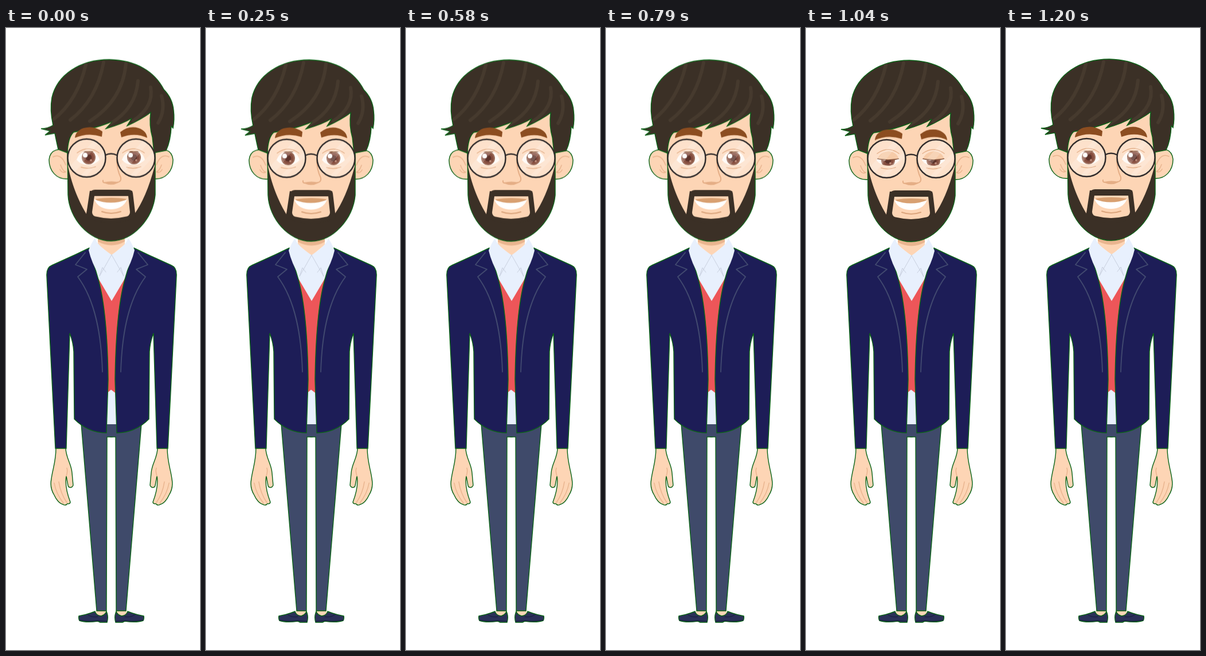
Recreate the animation shown at these times as an HTML page. Size 338x1080 px, loop 1.3 s.

```html
<!DOCTYPE html>
<html lang="en">
<head>
<meta charset="utf-8">
<title>Standing man</title>
<style>
html, body { margin: 0; width: 100%; height: 100%; overflow: hidden; background: #fff; }
svg { display: block; width: 338px; height: 1080px; }
.rim { stroke: #0c6418; stroke-width: 1.4; }
.line { fill: none; stroke-linecap: round; stroke-linejoin: round; }
.skin { fill: #fdd5b5; }
.fold { stroke: #e9b58f; stroke-width: 1.5; }
.hair { fill: #3b3026; }
.head, .brows, .lid, .iris { animation: 1300ms step-end infinite; }
.head { animation-name: bob; }
.brows { animation-name: frown; }
.lid { animation-name: blink; }
.iris { animation-name: gaze; }
@keyframes bob {
  0% { transform: translateY(-.3px); }
  3.08% { transform: translateY(0); }
  12% { transform: translateY(.3px); }
  66.92% { transform: translateY(.7px); }
  70% { transform: translateY(1px); }
  83.08% { transform: translateY(.5px); }
  86.15% { transform: translateY(0); }
  89.23% { transform: translateY(-.5px); }
  92.3%, 100% { transform: translateY(-1px); }
}
@keyframes frown {
  0% { transform: translateY(0); }
  63.85% { transform: translateY(1px); }
  66.92% { transform: translateY(2px); }
  70% { transform: translateY(3px); }
  80% { transform: translateY(2.5px); }
  83.08% { transform: translateY(1px); }
  86.15%, 100% { transform: translateY(0); }
}
@keyframes blink {
  0% { transform: translateY(0); }
  63.85% { transform: translateY(5px); }
  66.92% { transform: translateY(14px); }
  69.9% { transform: translateY(19px); }
  73.85% { transform: translateY(20px); }
  76.92% { transform: translateY(17px); }
  79.9% { transform: translateY(13px); }
  83.08% { transform: translateY(7px); }
  86.15% { transform: translateY(3px); }
  89.23%, 100% { transform: translateY(0); }
}
@keyframes gaze {
  0% { transform: translate(1px, -1px); }
  6.15% { transform: translate(0, 0); }
  63.85% { transform: translate(0, 2px); }
  69.9% { transform: translate(0, 5px); }
  79.9% { transform: translate(0, 3px); }
  86.15% { transform: translate(.5px, 0); }
  92.3%, 100% { transform: translate(1px, -.5px); }
}
</style>
</head>
<body>
<svg viewBox="0 0 338 1080">
  <defs>
    <path id="almond" d="M-20 3C-15-10-6-13 1-13C10-13 17-8 20 3C13 10 7 12 0 12C-8 12-15 9-20 3Z"/>
    <clipPath id="eyes">
      <use href="#almond" x="143" y="226"/>
      <use href="#almond" x="222" y="226"/>
    </clipPath>
    <clipPath id="scalp"><use href="#mop"/></clipPath>
    <clipPath id="lens"><circle r="33"/></clipPath>

    <g id="hand">
      <path class="skin rim" d="M87 729L104 729C104 746 114 757 115 772L117 794C115 799 109 799 108 794L105 778C103 790 105 805 112 823C112 827 107 826 107 826C104 830 100 828 99 827C93 826 87 818 84 811C79 803 77 793 79 783C81 766 87 754 87 729Z"/>
      <path class="line fold" d="M84 790Q87 808 100 825M92 788Q95 808 106 824M105 778Q108 769 106 764"/>
    </g>
    <g id="leg">
      <path fill="#fdd5b5" d="M157 1010H175V1022H157Z"/>
      <path class="rim" fill="#3f4a6a" d="M131 687L158 1012H175L176 710H185V687Z"/>
      <path class="rim" fill="#2b3158" d="M127 1021Q143 1018 155 1013Q157 1020 166 1021Q174 1018 175 1013Q179 1022 176 1032H164L160 1030Q140 1033 128 1029Q126 1025 127 1021Z"/>
      <path class="line" stroke="#1d2145" stroke-width="1.4" d="M128 1028Q145 1031 161 1029L176 1030M143 1019Q150 1024 160 1022"/>
    </g>
    <g id="coat">
      <path class="rim" fill="#1d1d57" d="M145 382L122 393L80 412Q70 416 71 431L86 730H105L111 530Q117 545 118 562L119 679Q143 703 175 703L178 610C177 540 173 480 161 437Z"/>
      <path class="line" stroke="#424a70" stroke-width="1.8" d="M138 390L121 411L141 419L125 432C155 472 166 530 168 597"/>
    </g>
    <g id="collar">
      <path fill="#e8f0fd" d="M155 365Q159 378 184 394L163 431Q149 408 144 386Q149 373 155 365Z"/>
      <path class="line" stroke="#c8cfde" stroke-width="1" d="M184 394L163 431L168 416L174 424"/>
    </g>
    <g id="ear">
      <path class="skin rim" d="M107 217C95 207 77 210 75 229C75 248 88 264 108 262Z"/>
      <path class="line fold" d="M82 224Q96 217 104 238M95 238Q99 249 104 250Q98 253 94 246"/>
    </g>
    <g id="ball">
      <circle r="12" fill="#9a6a58"/>
      <circle r="9.5" fill="#864e40"/>
      <circle r="5.5" fill="#5c332b"/>
      <circle cx="-6" cy="-4" r="4" fill="#fff"/>
      <circle cx="4" cy="5" r="2" fill="#b98978"/>
    </g>
    <g id="shade">
      <path fill="#f6cba8" d="M-24-50H24V-14Q0-8-24-14Z"/>
      <path class="line" stroke="#8a5a40" stroke-width="1.6" d="M-24-14Q0-8 24-14"/>
    </g>
    <path id="crease" class="line" stroke="#e5b28c" stroke-width="1.5" d="M-19-9Q0-23 19-9M-12 16Q1 20 13 15"/>
    <circle id="tint" r="33" fill="#fff" opacity=".3"/>
    <g id="glass">
      <g clip-path="url(#lens)" fill="#fff" opacity=".18">
        <path d="M-35 20L18-36H29L-24 29ZM-14 34L36-18V-8L-5 36Z"/>
      </g>
      <circle r="33" fill="none" stroke="#302c2c" stroke-width="2.5"/>
    </g>
    <path id="mop" d="M61 175Q72 175 82 169Q76 143 80 121C89 82 128 55 180 55C227 56 259 76 275 107Q290 122 292 143Q294 159 291 174L288 171Q287 196 279 213L258 217L255 190Q249 169 252 147Q236 159 211 170L219 157Q203 167 174 175L186 162Q160 174 118 181Q108 190 107 217L91 211Q88 198 85 183L68 186L77 179Z"/>
  </defs>

  <use href="#leg"/>
  <use href="#leg" transform="matrix(-1 0 0 1 367 0)"/>
  <path fill="#3f4a6a" d="M168 688H199V709.3H168Z"/>
  <use href="#hand"/>
  <use href="#hand" transform="matrix(-1 0 0 1 368 0)"/>

  <path fill="#e8f0fd" d="M150 390H218L206 450L192 688H176L162 450Z"/>
  <path fill="#ed5659" d="M158 430L184 474L210 430L198 600L191 634L183 628L176 634Z"/>
  <use href="#coat"/>
  <use href="#coat" transform="matrix(-1 0 0 1 368 0)"/>

  <g class="head">
    <path class="skin" d="M160 355H207V376L184 395L160 376Z"/>
    <path fill="#e9b58f" d="M160 364H207V371Q184 384 160 371Z"/>
    <use href="#collar"/>
    <use href="#collar" transform="matrix(-1 0 0 1 368 0)"/>
    <use href="#ear"/>
    <use href="#ear" transform="matrix(-1 0 0 1 366 0)"/>

    <path class="hair rim" d="M107 195H260V290C256 331 222 370 183 370C144 370 110 331 108 290Z"/>
    <path class="skin" d="M108 150H259V240C249 278 237 305 224 323L220 283H146L140 323C129 305 116 278 108 240Z"/>
    <path class="hair" d="M147 287Q148 281 155 281H213Q220 281 221 287L226 329Q184 350 139 329Z"/>
    <path class="skin" d="M154 292H213L216 320Q216 327 207 328Q183 334 159 328Q150 327 150 320Z"/>
    <path fill="#d8a071" d="M156 297Q184 293 210 297L204 306H163Z"/>
    <path fill="#fff" d="M154 298Q183 309 211 298C206 310 195 315 183 315C170 315 159 310 154 298Z"/>
    <path class="line" stroke="#dba57d" stroke-width="2" d="M167 319Q183 325 200 319"/>
    <path class="line" stroke="#e5ae86" stroke-width="2" d="M193 228Q193 246 200 260Q201 267 195 268M169 265Q168 269 173 269Q184 274 195 268"/>
    <path fill="#e5ae86" d="M171 268Q184 265 196 268Q184 275 171 268Z"/>

    <use href="#mop" class="hair rim"/>
    <g clip-path="url(#scalp)" class="line" stroke="#463a2e" stroke-width="6">
      <path d="M84 158Q125 125 139 64M112 160Q158 125 170 60M146 162Q203 126 209 62M182 166Q226 140 230 92M222 161Q258 137 252 103M265 165Q278 144 271 118"/>
    </g>

    <g class="brows" fill="#8c4d20">
      <path d="M120 191Q121 179 135 174Q153 169 168 180L167 189Q143 181 120 191Z"/>
      <path d="M246 191Q245 179 231 174Q214 169 199 181L201 190Q225 181 246 191Z"/>
    </g>

    <use href="#tint" x="140.5" y="226"/>
    <use href="#tint" x="226.5" y="226"/>
    <g clip-path="url(#eyes)">
      <path fill="#fffaf6" d="M120 205H245V245H120Z"/>
      <g class="iris">
        <use href="#ball" x="143" y="226"/>
        <use href="#ball" x="222" y="226"/>
      </g>
      <g class="lid">
        <use href="#shade" x="143" y="226"/>
        <use href="#shade" x="222" y="226"/>
      </g>
    </g>
    <use href="#crease" x="143" y="226"/>
    <use href="#crease" x="222" y="226"/>
    <use href="#glass" x="140.5" y="226"/>
    <use href="#glass" x="226.5" y="226"/>
    <path class="line" stroke="#302c2c" stroke-width="2.5" d="M173 221Q183 216 193 221"/>
  </g>
</svg>
</body>
</html>
```
